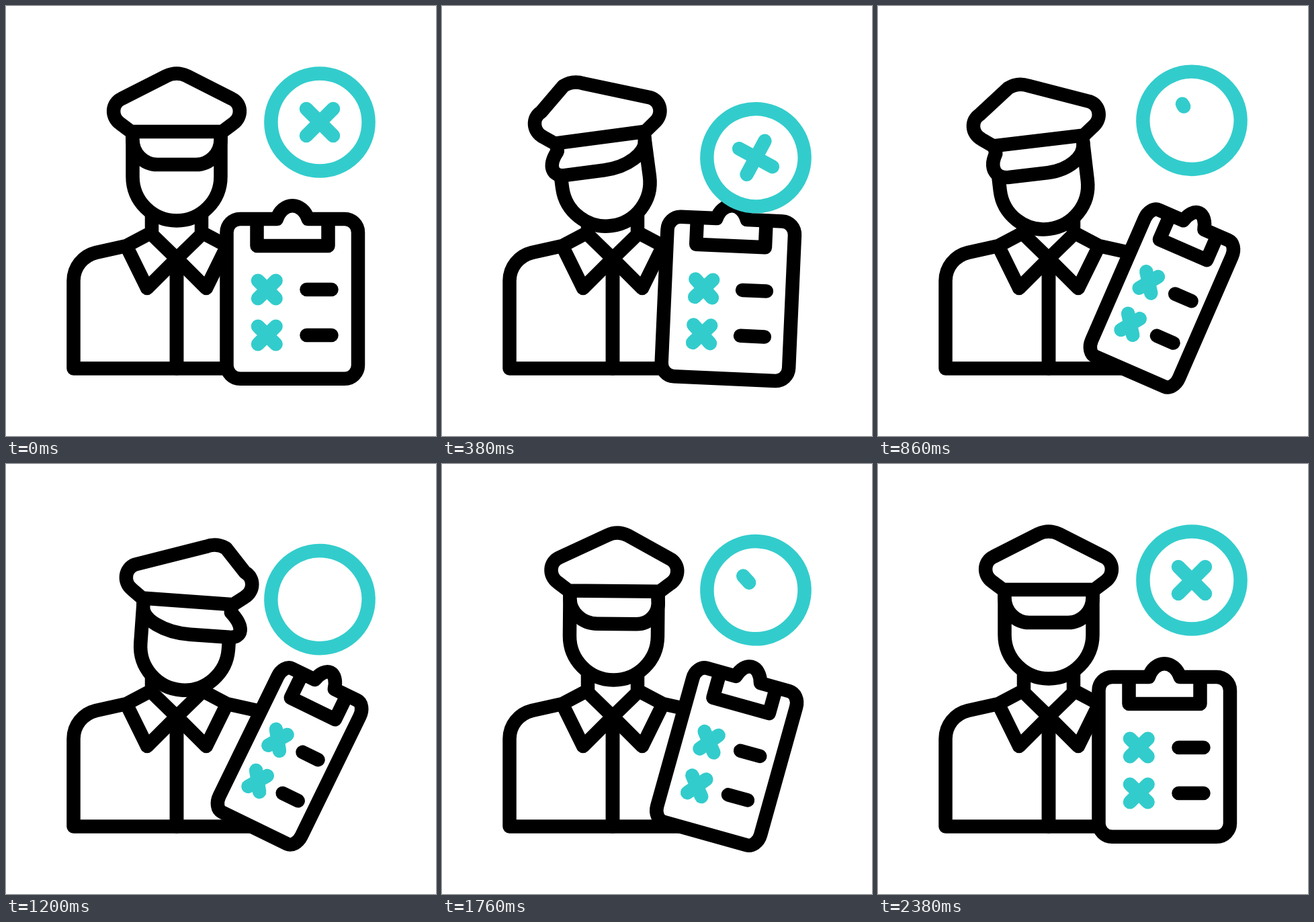
An HTML page with a canvas that plays this animation: 640x640 px, repeating every 2400 ms.

```html
<!DOCTYPE html>
<html lang="en">
<head>
<meta charset="utf-8">
<title>Officer with checklist</title>
<style>
  html, body { margin: 0; height: 100%; overflow: hidden; background: #fff; }
  canvas { display: block; }
</style>
</head>
<body>
<canvas id="stage" width="640" height="640"></canvas>
<script>
const ctx = document.getElementById('stage').getContext('2d');
const LOOP = 2400, TEAL = '#33cccc';

// Eased value at time t from [time, value] keys.
function at(t, keys) {
  const next = keys.findIndex(([time]) => time > t);
  if (next === 0) return keys[0][1];
  if (next < 0) return keys[keys.length - 1][1];
  const [t0, a] = keys[next - 1], [t1, b] = keys[next];
  const u = (t - t0) / (t1 - t0);
  return a + (b - a) * u * u * (3 - 2 * u);
}

// Rises from 0 to 1, holds, and falls back.
const pulse = (t, start, top, hold, end) => at(t, [[start, 0], [top, 1], [hold, 1], [end, 0]]);

// Moves the path but keeps the line width constant.
function draw(path, { color = '#000', fill = false, matrix = new DOMMatrix() } = {}) {
  const moved = new Path2D();
  moved.addPath(new Path2D(path), matrix);
  if (fill) {
    ctx.fillStyle = '#fff';
    ctx.fill(moved);
  }
  ctx.strokeStyle = color;
  ctx.stroke(moved);
}

function drawBody() {
  const half = 'M217 305V338M179 357L215 338L254 376L210 420Z' +
    'L134 367C114 372 100.5 389 100.5 409V539.5H254V376';
  draw(half);
  draw(half, { matrix: new DOMMatrix([-1, 0, 0, 1, 508, 0]) });
}

// The head tilts as a whole; the cap's peak and the visor slide sideways on it.
function drawHead(t) {
  const left = pulse(t, 0, 590, 660, 1270);
  const right = pulse(t, 660, 1270, 1320, 1880);
  const slide = 39 * right - 41 * left;
  const leftBulge = Math.min(slide, 0), rightBulge = Math.max(slide, 0);
  const matrix = new DOMMatrix()
    .translate(254 + 12.6 * right - 14 * left, 254 + 17.4 * right + 11.4 * left)
    .rotate(4.6 * right - 10.6 * left)
    .translate(-254, -254);

  const face = 'M188.5 190V254a65.5 65.5 0 0 0 131 0V190';
  const visor = `M188.5 187V199
    C${188.5 + 0.6 * leftBulge} 219 ${204.6 + (slide + leftBulge) / 2} 236 ${225 + slide} 236
    H${283 + slide}
    C${303.4 + (slide + rightBulge) / 2} 236 ${319.5 + 0.6 * rightBulge} 219 319.5 199V187`;
  const cap = `M186 187L170 175C156 165 157 145 172 138
    L${239 + slide} 104Q${254 + slide} 97 ${269 + slide} 104
    L336 138C351 145 352 165 338 175L322 187Z`;
  for (const part of [face, visor, cap]) draw(part, { fill: true, matrix });
}

function drawClipboard(t) {
  const turn = pulse(t, 230, 1010, 1280, 2390);
  const matrix = new DOMMatrix()
    .translate(426.3, 426.3)
    .rotate(26 * turn)
    .scale(1 - 0.305 * turn, 1)
    .translate(-426.3, -426.3);

  draw('M403 317C407 305 416 297.2 426.3 297.2S445.6 305 449.6 317' +
    'H504a20 20 0 0 1 20 20V534.8a20 20 0 0 1 -20 20' +
    'H348.5a20 20 0 0 1 -20 -20V337a20 20 0 0 1 20 -20Z', { fill: true, matrix });
  draw('M373.5 317V357H479.5V317', { matrix });
  ctx.lineCap = 'round';
  for (const y of [422, 490]) {
    draw(`M447.5 ${y}h37`, { matrix });
    draw(`M375 ${y - 13.3}l26.6 26.6m0 -26.6l-26.6 26.6`, { color: TEAL, matrix });
  }
}

function drawBadge(t) {
  const y = at(t, [173, 227, 137.5, 224, 152.7, 188, 173].map((v, i) => [i * 356, v]));
  const angle = at(t, [[0, 0], [360, -17], [720, 16], [1700, 3.5], [2150, 0]]);
  const drawn = 2 - 2 * pulse(t, 390, 925, 1610, 2310);
  const matrix = new DOMMatrix().translate(467, y).rotate(angle);

  draw('M-72.6 0a72.6 72.6 0 0 1 145.2 0a72.6 72.6 0 0 1 -145.2 0Z', { color: TEAL, matrix });
  [1, -1].forEach((slope, i) => {
    const length = 40 * Math.min(1, drawn - i);
    if (length > 0) draw(`M-20 ${-20 * slope}l${length} ${length * slope}`, { color: TEAL, matrix });
  });
}

function render(now) {
  const t = now % LOOP;
  ctx.fillStyle = '#fff';
  ctx.fillRect(0, 0, 640, 640);
  ctx.lineWidth = 20.5;
  ctx.lineJoin = 'round';
  ctx.lineCap = 'butt';
  drawBody();
  drawHead(t);
  drawClipboard(t);
  drawBadge(t);
}

const start = performance.now();
function tick() {
  render(performance.now() - start);
  requestAnimationFrame(tick);
}
tick();
</script>
</body>
</html>
```
